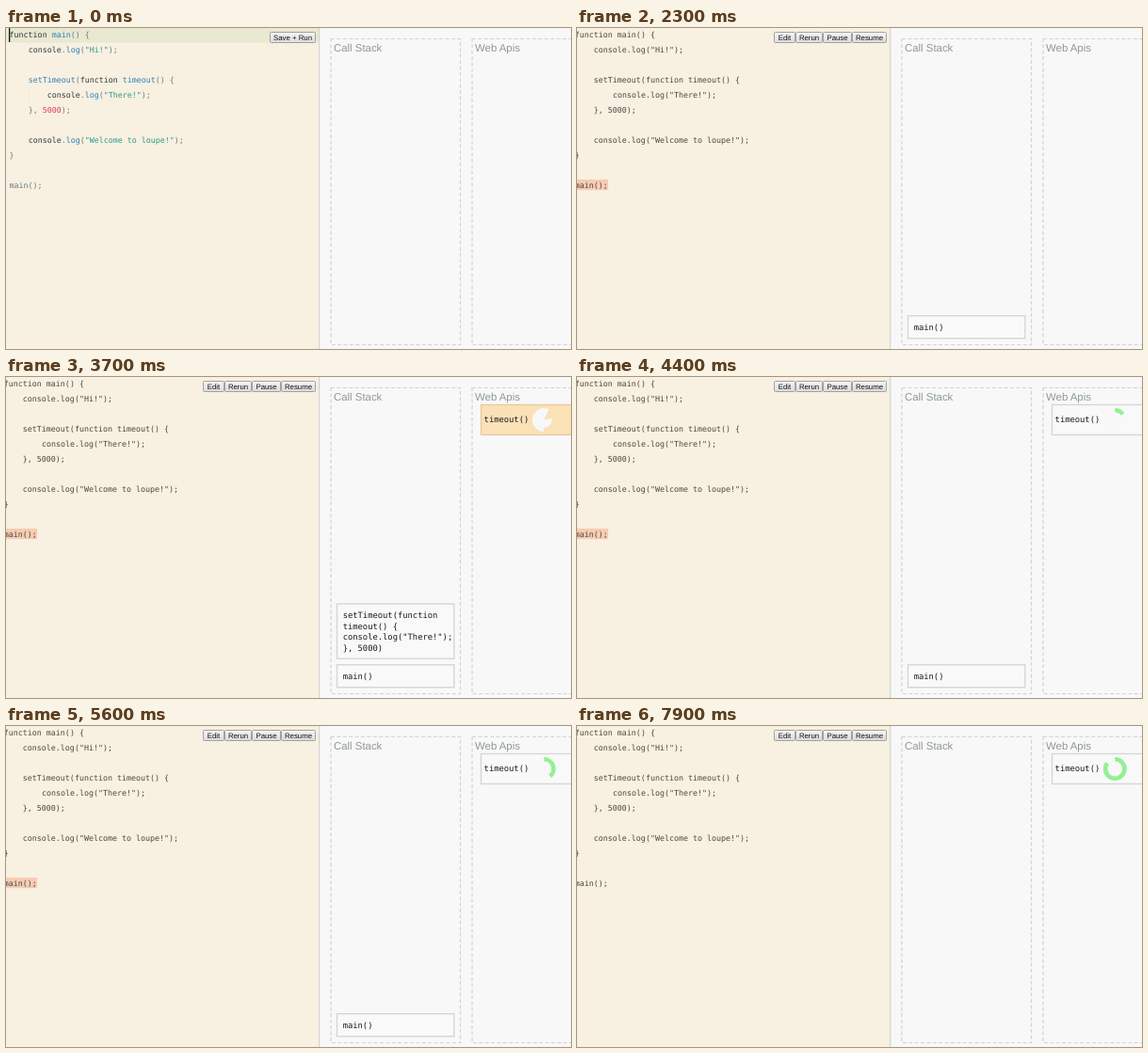
An HTML page for the animation above (8000 ms loop, 600 by 341 pixels).

```html
<!DOCTYPE html>
<html lang="en">
<head>
<meta charset="utf-8">
<title>Call stack</title>
<style>
  html, body { margin: 0; width: 100%; height: 100%; overflow: hidden; background: #f8f8f8; }
  svg { display: block; width: 100%; height: 100%; }
  text { white-space: pre; text-rendering: geometricPrecision; }
  .code { font: 8.32px "DejaVu Sans Mono", "Noto Sans Mono", monospace; fill: #4a4843; }
  .item { font: 8.8px "DejaVu Sans Mono", "Noto Sans Mono", monospace; fill: #181818; }
  .head { font: 11.4px "Liberation Sans", Arial, sans-serif; fill: #8f9898; }
  .btn { font: 7.8px "Liberation Sans", Arial, sans-serif; fill: #111; text-anchor: middle; }
  .area { fill: none; stroke: #d3d3d3; stroke-width: 1.2; stroke-dasharray: 4 2.4; }
  .box { fill: #f9f9f9; stroke: #d6d6d6; stroke-width: 1.4; }
  .mark { fill: #f7ccb3; }
</style>
</head>
<body>
<svg id="stage" viewBox="0 0 600 341" preserveAspectRatio="none">
  <defs>
    <linearGradient id="face" x2="0" y2="1">
      <stop offset="0" stop-color="#f5f5f5"/>
      <stop offset="1" stop-color="#dcdcdc"/>
    </linearGradient>
  </defs>
  <rect width="600" height="341" fill="#f8f8f8"/>
  <rect width="332.5" height="341" fill="#f8f0e0"/>
  <rect x="332" width="1.3" height="341" fill="#d4d6d6"/>
  <rect class="area" x="345" y="11.5" width="137.5" height="325"/>
  <rect class="area" x="495" y="11.5" width="137.5" height="325"/>
  <text class="head" x="348" y="25">Call Stack</text>
  <text class="head" x="498" y="25">Web Apis</text>
</svg>
<script>
const LOOP = 8000;
const CHAR = 5.01;
const stage = document.getElementById('stage');

function add(parent, tag, attrs = {}, text) {
  const el = document.createElementNS('http://www.w3.org/2000/svg', tag);
  for (const key in attrs) el.setAttribute(key, attrs[key]);
  if (text !== undefined) el.textContent = text;
  parent.appendChild(el);
  return el;
}
const group = () => add(stage, 'g');
const show = (el, on) => el.setAttribute('visibility', on ? 'visible' : 'hidden');
const within = (t, from, to) => t >= from && t < to;

function button(parent, x, w, label) {
  add(parent, 'rect', { x: x + .5, y: 4.5, width: w - 1, height: 11, rx: 1, fill: 'url(#face)', stroke: '#999', 'stroke-width': .9 });
  add(parent, 'text', { class: 'btn', x: x + w / 2, y: 12.8 }, label);
}

// Source lines: [row, indent, [text, colour]...]
const DARK = '#2f3b40', GREY = '#657b83', BLUE = '#2d80bd', TEAL = '#2a9a90', PINK = '#d9415f';
const call = text => [['console', DARK], ['.', GREY], ['log', BLUE], ['(', GREY], [text, TEAL], [');', GREY]];
const lines = [
  [0, 0, ['function ', DARK], ['main', BLUE], ['() {', GREY]],
  [1, 4, ...call('"Hi!"')],
  [3, 4, ['setTimeout', BLUE], ['(', GREY], ['function ', DARK], ['timeout', BLUE], ['() {', GREY]],
  [4, 8, ...call('"There!"')],
  [5, 4, ['}, ', GREY], ['5000', PINK], [');', GREY]],
  [7, 4, ...call('"Welcome to loupe!"')],
  [8, 0, ['}', GREY]],
  [10, 0, ['main();', GREY]]
];
const baseline = row => 10.2 + row * 16;

// Editor view
const editor = group();
add(editor, 'rect', { width: 332, height: 15.5, fill: '#e9e8d1' });
add(editor, 'rect', { x: 3, width: 1.3, height: 15, fill: '#111' });
add(editor, 'path', { d: 'M24.2 64V79', stroke: '#e2ddcf', 'stroke-width': .7, 'stroke-dasharray': '1 1' });
for (const [row, indent, ...parts] of lines) {
  const text = add(editor, 'text', { class: 'code', x: 3.6 + indent * CHAR, y: baseline(row) });
  for (const [word, fill] of parts) add(text, 'tspan', { style: `fill:${fill}` }, word);
}
button(editor, 280, 49, 'Save + Run');

// Running view, with one group of marks per call
const runner = group();
function mark(...spans) {
  const g = add(runner, 'g');
  for (const [row, from, to] of spans) {
    const x = Math.max(0, from * CHAR - 2);
    add(g, 'rect', { class: 'mark', x, y: row * 16 + 1, width: to * CHAR - 2 - x, height: 11.2 });
  }
  return g;
}
const marks = {
  main: mark([10, 0, 7]),
  hi: mark([1, 4, 23]),
  timer: mark([3, 4, 35], [4, 0, 30], [5, 0, 13]),
  welcome: mark([7, 4, 37])
};
for (const [row, indent, ...parts] of lines) {
  add(runner, 'text', { class: 'code', x: -2.2 + indent * CHAR, y: baseline(row) }, parts.map(p => p[0]).join(''));
}
[[209, 23, 'Edit'], [232, 29, 'Rerun'], [261, 31, 'Pause'], [292, 37, 'Resume']]
  .forEach(b => button(runner, ...b));

// Call stack items grow upward from their bottom edge
function item(bottom, rows) {
  const g = group();
  const height = 24 + (rows.length - 1) * 11.4;
  const top = bottom - height;
  add(g, 'rect', { class: 'box', x: 351.5, y: top, width: 124.3, height });
  rows.forEach((row, i) => add(g, 'text', { class: 'item', x: 357.7, y: top + 15.3 + i * 11.4 }, row));
  return g;
}
const items = {
  main: item(329.7, ['main()']),
  hi: item(299.2, ['console.log("Hi!")']),
  timer: item(299.2, ['setTimeout(function', 'timeout() {', 'console.log("There!");', '}, 5000)']),
  welcome: item(299.2, ['console.log("Welcome', 'to loupe!")'])
};

// [name, mark on, item on, mark off, item off]
const steps = [
  ['main', 800, 900, 5900, 6000],
  ['hi', 1500, 1600, 2200, 2300],
  ['timer', 3000, 3000, 3700, 3800],
  ['welcome', 4500, 4500, 5200, 5300]
];

// Pending timer
const CX = 571.3, CY = 45.5, START = 3650, WAIT = 5000;
function point(deg, r) {
  const a = deg * Math.PI / 180;
  return `${(CX + r * Math.sin(a)).toFixed(2)} ${(CY - r * Math.cos(a)).toFixed(2)}`;
}
const arc = (from, to, r) => `M${point(from, r)}A${r} ${r} 0 ${to - from > 180 ? 1 : 0} 1 ${point(to, r)}`;
const wedge = (from, to, r) => `${arc(from, to, r)}L${CX} ${CY}Z`;

const api = group();
add(api, 'rect', { class: 'box', x: 504.5, y: 29.5, width: 125, height: 32 });
const flash = add(api, 'rect', { x: 504, y: 29, width: 126, height: 33, fill: '#ffb030' });
add(api, 'path', { d: wedge(180, 385, 12.4) + wedge(80, 180, 8.5), fill: '#f8f8f8' });
add(api, 'text', { class: 'item', x: 507.6, y: 47.6 }, 'timeout()');
const ring = add(api, 'path', { fill: 'none', stroke: '#92f192', 'stroke-width': 4.6 });

function draw(t) {
  show(editor, t < 100);
  show(runner, t >= 100);
  for (const [name, markOn, itemOn, markOff, itemOff] of steps) {
    marks[name].setAttribute('display', within(t, markOn, markOff) ? 'inline' : 'none');
    show(items[name], within(t, itemOn, itemOff));
  }
  show(api, t >= 3700);
  flash.setAttribute('opacity', .33 * Math.max(0, Math.min(1, 1 - (t - 3700) / 600)));
  const angle = Math.max(0, (t - START) / WAIT * 360);
  ring.setAttribute('d', t >= 3800 ? arc(0, angle, 10.2) : '');
}

const begin = performance.now();
function tick() {
  draw((performance.now() - begin) % LOOP);
  requestAnimationFrame(tick);
}
draw(0);
requestAnimationFrame(tick);
</script>
</body>
</html>
```
